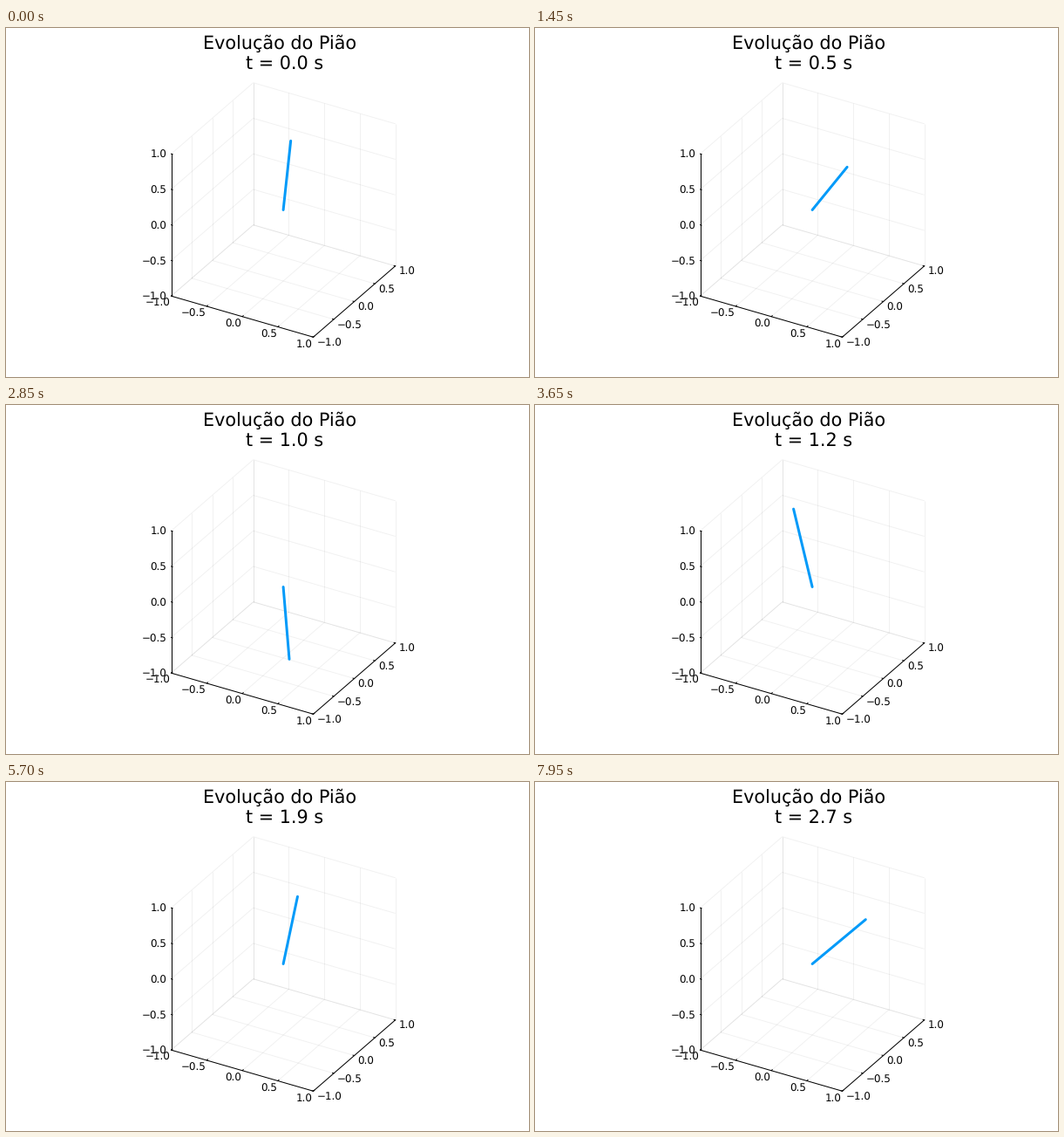
Write a matplotlib script that moves like this. It is 600 px wide and 400 px high and loops after 8000 ms.

```python
import numpy as np
import matplotlib.pyplot as plt
from matplotlib.animation import FuncAnimation

W, H, DPI = 600, 400, 100
PX = 72 / DPI                      # points per pixel
FRAMES, INTERVAL = 160, 50
CENTER = np.array([318.1, 208.5])
SCALE = 94.1
SPIN = 9.86                        # rad/s
THETA0 = 0.1
TICKS = (-1.0, -0.5, 0.0, 0.5, 1.0)

plt.rcParams["font.family"] = "DejaVu Sans"
plt.rcParams["text.hinting"] = "none"
fig = plt.figure(figsize=(W / DPI, H / DPI), dpi=DPI, facecolor="white")
ax = fig.add_axes([0, 0, 1, 1])
ax.set_xlim(0, W)
ax.set_ylim(H, 0)
ax.axis("off")


def project(x, y, z):
    """Orthographic view, azimuth 30 and elevation 30 degrees."""
    c, s = np.cos(np.pi / 6), np.sin(np.pi / 6)
    right = c * x + s * y
    up = -s * s * x + c * s * y + c * z
    return CENTER + SCALE * np.array([right, -up])


def stroke(p, q, width, **style):
    return ax.plot([p[0], q[0]], [p[1], q[1]], lw=width * PX, **style)[0]


def label(x, y, text, size, ha="left"):
    return ax.text(x, y, text, fontsize=size * PX, ha=ha, va="baseline",
                   color="black")


def grid(p, q):
    stroke(project(*p), project(*q), 1, color="black", alpha=0.055,
           solid_capstyle="butt")


def tick(point, step, text, offset, ha):
    stroke(point, point + np.array(step), 1, color="black")
    label(point[0] + offset[0], point[1] + offset[1] + 4.4, text, 11.9, ha)


def draw_box():
    for v in TICKS:
        grid((v, -1, -1), (v, 1, -1))
        grid((v, 1, -1), (v, 1, 1))
        grid((-1, v, -1), (1, v, -1))
        grid((-1, v, -1), (-1, v, 1))
        grid((-1, -1, v), (-1, 1, v))
        grid((-1, 1, v), (1, 1, v))

    for p, q in (((-1, -1, -1), (-1, -1, 1)),
                 ((-1, -1, -1), (1, -1, -1)),
                 ((1, -1, -1), (1, 1, -1))):
        stroke(project(*p), project(*q), 1, color="black")

    for v in TICKS:
        text = f"{v:.1f}".replace("-", "\u2212")
        tick(project(v, -1, -1), (1.2, -1.0), text, (-1.0, 7.7), "right")
        tick(project(1, v, -1), (-1.5, -0.4), text, (3.9, 6.1), "left")
        tick(project(-1, -1, v), (1.5, 0.4), text, (-5.3, 0.6), "right")


def angle(n):
    # short start-up step, then nearly even steps of 1/6 rad
    steady = n / 6 + 0.036 - 1.25e-5 * (n - 106) ** 2
    return max(THETA0 + 0.015 * n, steady)


draw_box()
label(226.0, 24.2, "Evolução do Pião", 20.8)
clock = label(274.6, 47.0, "", 20.8)
rod = stroke(CENTER, CENTER, 3, color="#009AF9", solid_capstyle="round")


def update(n):
    a = angle(n)
    # polar angle and precession angle advance together
    tip = project(np.sin(a) * np.cos(a), np.sin(a) ** 2, np.cos(a))
    rod.set_data([CENTER[0], tip[0]], [CENTER[1], tip[1]])
    clock.set_text(f"t = {(a - THETA0) / SPIN:.1f} s")
    return rod, clock


anim = FuncAnimation(fig, update, frames=FRAMES, interval=INTERVAL,
                     init_func=lambda: update(0), repeat=True, repeat_delay=0)
plt.show()
```
